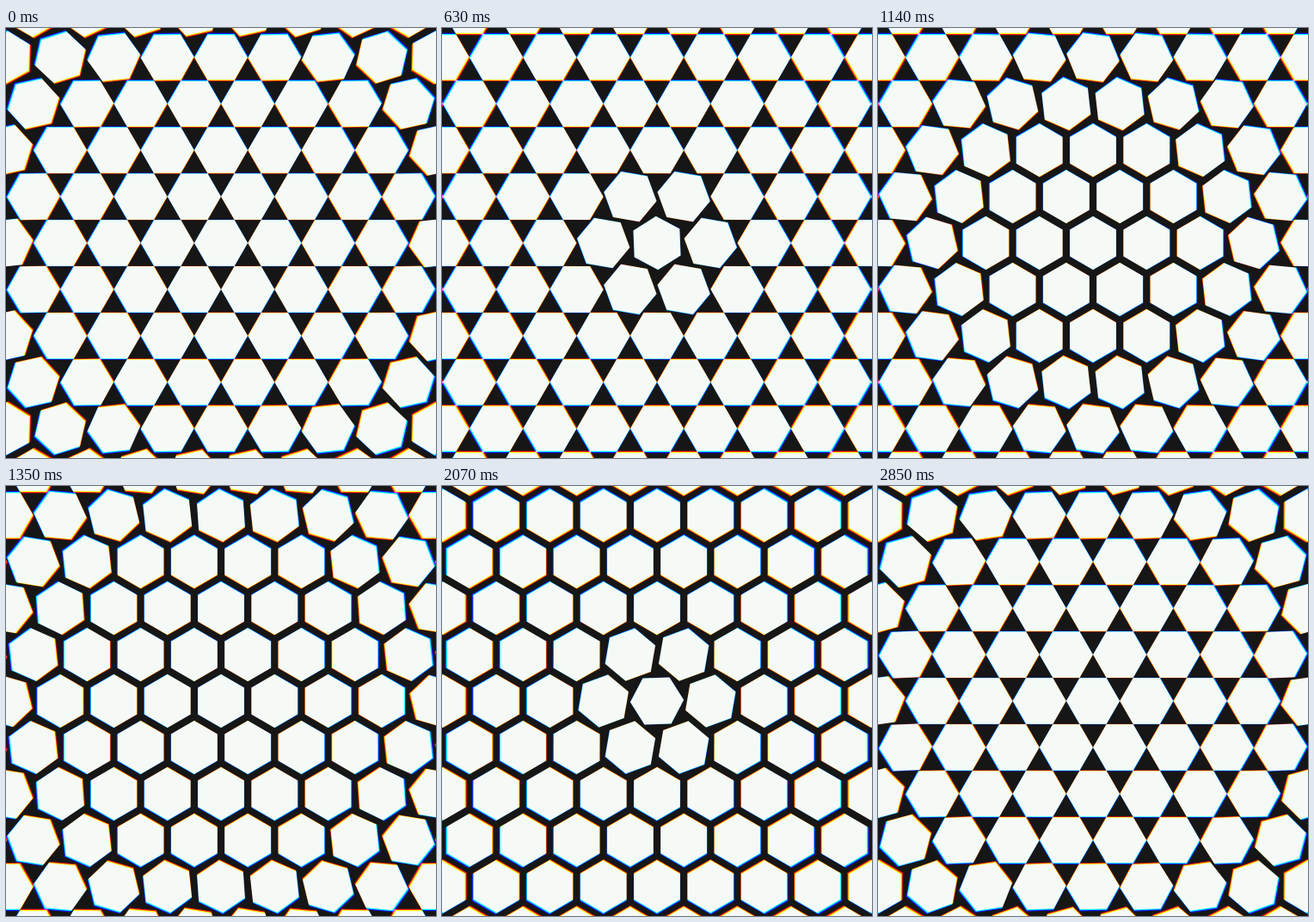
These frames come from a looping animation (500x500 px, 2.88 s). An HTML page with a canvas:

```html
<!DOCTYPE html>
<html lang="en">
<head>
<meta charset="utf-8">
<title>Turning hexagons</title>
<style>
html, body { margin: 0; width: 100%; height: 100%; overflow: hidden; background: #161616; }
canvas { display: block; }
</style>
</head>
<body>
<canvas id="stage" width="500" height="500"></canvas>
<script>
const ctx = document.getElementById('stage').getContext('2d');
const LOOP = 2880, HALF = LOOP / 2, STEP = 30;
const ROW = 54, GAP = ROW * 2 / Math.sqrt(3), RADIUS = GAP / 2;
const START = 230, TURN = 480, DELAY = 3.47; // ms, ms, ms per px from the centre
const SIXTH = Math.PI / 3;

// Each colour channel is magnified slightly differently about the centre.
const CHANNELS = [
  ['rgb(223,0,0)', 0.995],
  ['rgb(0,228,0)', 1],
  ['rgb(0,0,225)', 1.005],
];

const cells = [];
for (let row = -5; row <= 5; row++) {
  for (let col = -5; col <= 5; col++) {
    const x = (col + (row & 1) / 2) * GAP, y = row * ROW;
    cells.push({ x, y, dist: Math.hypot(x, y) });
  }
}

function ease(p) {
  p = Math.min(1, Math.max(0, p));
  return p * p * (3 - 2 * p);
}

// Every half loop a wave leaves the centre and turns each cell by 30 degrees.
function angle(time, dist) {
  let turns = 1;
  for (let wave = -1; wave <= 1; wave++) {
    turns += ease((time - wave * HALF - START - DELAY * dist) / TURN);
  }
  return turns * SIXTH / 2;
}

function hexagons(time) {
  const path = new Path2D();
  for (const { x, y, dist } of cells) {
    const a = angle(time, dist);
    for (let i = 0; i < 6; i++) {
      const px = x + RADIUS * Math.cos(a + i * SIXTH);
      const py = y + RADIUS * Math.sin(a + i * SIXTH);
      if (i) path.lineTo(px, py);
      else path.moveTo(px, py);
    }
    path.closePath();
  }
  return path;
}

function draw() {
  const time = Math.floor(performance.now() % LOOP / STEP) * STEP;
  const path = hexagons(time);
  ctx.setTransform(1, 0, 0, 1, 0, 0);
  ctx.globalCompositeOperation = 'source-over';
  ctx.fillStyle = '#161616';
  ctx.fillRect(0, 0, 500, 500);
  ctx.globalCompositeOperation = 'lighter';
  for (const [color, zoom] of CHANNELS) {
    ctx.setTransform(zoom, 0, 0, zoom, 250, 250);
    ctx.fillStyle = color;
    ctx.fill(path);
  }
  requestAnimationFrame(draw);
}
draw();
</script>
</body>
</html>
```
